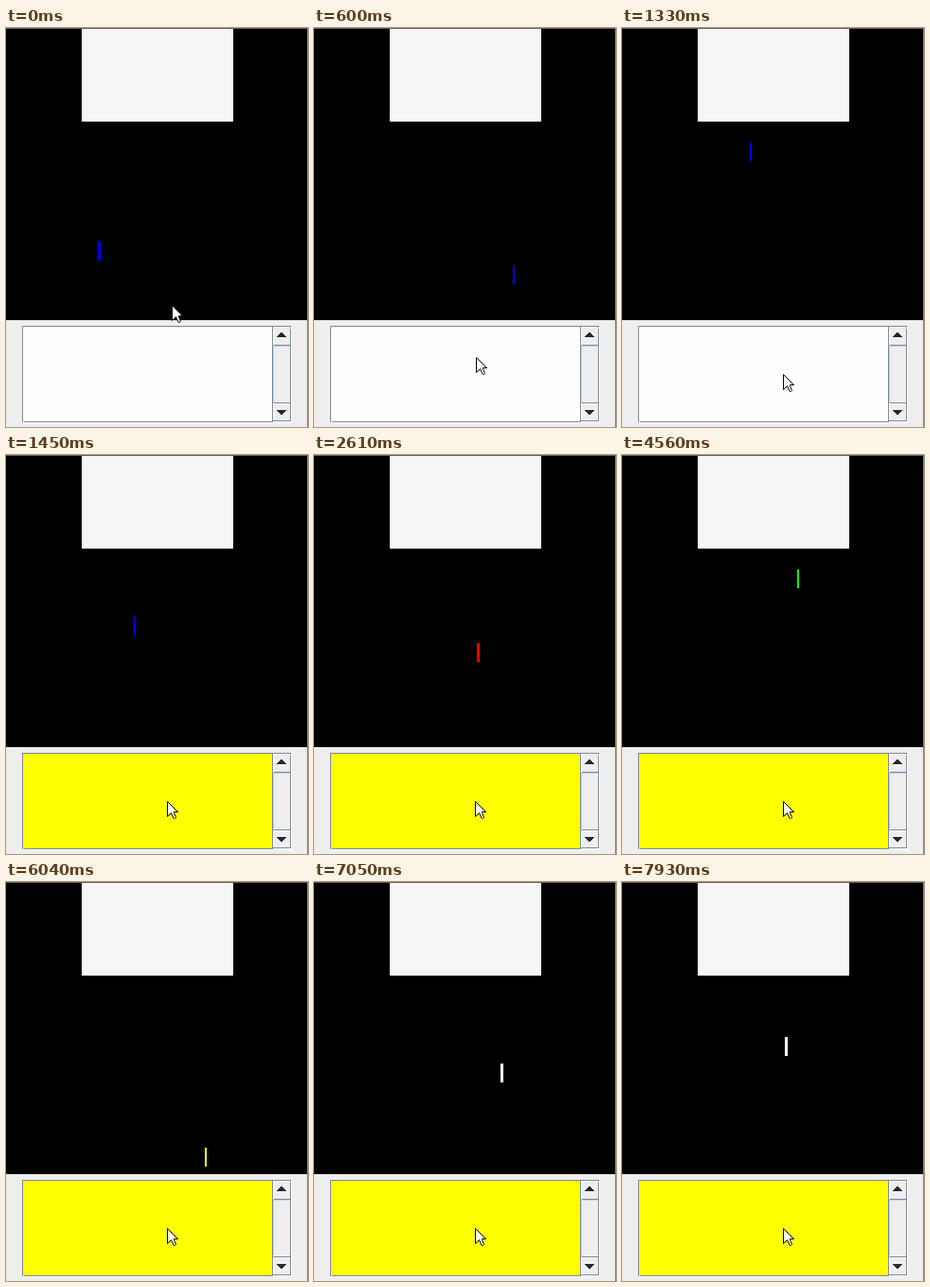
Animation of 319 by 422 pixels, one loop 8 s. Source, as an HTML page with a canvas:

```html
<!DOCTYPE html>
<html lang="en">
<head>
<meta charset="utf-8">
<title>Falling notes</title>
<style>
html, body { margin: 0; width: 100%; height: 100%; overflow: hidden; background: #eee; }
canvas { display: block; }
</style>
</head>
<body>
<canvas id="stage" width="319" height="422"></canvas>
<script>
const ctx = document.getElementById('stage').getContext('2d');
const LOOP = 8000, STEPS = 55, YELLOW_AT = 1450;
const TOP = 99, FLOOR = 308, SPEED = 0.41, NOTE_HEIGHT = 20;

// One digit per note: the column it falls in
const TUNE = '0963864257091836';
const COLORS = ['#0000ff', '#ff0000', '#10f010', '#ffff50', '#ffffff'];

// Key points of slightly uneven clocks: index, time
const NOTE_CLOCK = [[0, -310], [3, 1274], [5, 2365], [9, 4505], [11, 5595], [15, 7771]];
const STEP_CLOCK = [[0, 0], [9, 1330], [10, 1450], [18, 2610], [31, 4560], [41, 6040], [54, 7930]];

const EDGE = '#7a8a99', SHADE = '#b8cfe5', LIGHT = '#fff', FACE = '#eee';

function interpolate(points, x) {
  const i = Math.max(1, points.findIndex(p => x <= p[0]));
  const [x0, y0] = points[i - 1], [x1, y1] = points[i];
  return y0 + (y1 - y0) * (x - x0) / (x1 - x0);
}

const notes = [...TUNE].map((column, i) => ({
  start: interpolate(NOTE_CLOCK, i),
  x: 97.5 + 12.5 * column,
  color: COLORS[Math.max(0, Math.floor((i - 1) / 3))]
}));
const steps = Array.from({ length: STEPS }, (_, i) => Math.round(interpolate(STEP_CLOCK, i)));

function box(x, y, w, h, color) {
  ctx.fillStyle = color;
  ctx.fillRect(x, y, w, h);
}

function row(x0, x1, y, color) { box(x0, y, x1 - x0 + 1, 1, color); }
function col(x, y0, y1, color) { box(x, y0, 1, y1 - y0 + 1, color); }

function drawStage() {
  box(0, 0, 319, 309, '#000');
  box(80, 1, 160, 98, '#f6f6f6');
  row(0, 318, 0, '#606060');
}

function drawNote(t) {
  const { start, x, color } = notes.filter(n => n.start <= t).pop();
  const y = Math.floor(TOP + SPEED * (t - start));
  const left = Math.floor(x);
  const bottom = Math.min(FLOOR, y + NOTE_HEIGHT);
  if (bottom > y) box(left, y, x > left ? 3 : 2, bottom - y, color);
}

function drawArrow(y, dir) {
  for (let i = 0; i < 5; i++) row(290 - i, 291 + i, y + i * dir, '#282828');
}

function drawScrollBar() {
  box(282, 316, 18, 100, FACE);
  col(281, 316, 415, EDGE);

  row(282, 299, 316, LIGHT);
  col(282, 316, 334, LIGHT);
  drawArrow(322, 1);

  col(282, 336, 396, SHADE);
  row(282, 299, 336, SHADE);
  row(283, 300, 335, EDGE);
  row(283, 300, 396, EDGE);

  row(282, 299, 397, LIGHT);
  col(282, 397, 414, LIGHT);
  row(282, 300, 415, EDGE);
  row(282, 301, 416, LIGHT);
  drawArrow(408, -1);
}

function drawPanel(t) {
  box(0, 309, 319, 113, FACE);
  box(17, 315, 284, 102, EDGE);
  box(18, 316, 263, 100, t < YELLOW_AT ? '#fefefe' : '#ff0');
  col(301, 316, 417, LIGHT);
  row(18, 301, 417, LIGHT);
  drawScrollBar();
  box(300, 317, 1, 1, FACE);
  box(18, 416, 1, 1, FACE);
  col(318, 0, 421, '#808080');
}

function drawPointer(t) {
  const k = Math.min(1, Math.max(0, (t - 150) / 590));
  ctx.save();
  ctx.translate(Math.round(175 - 5 * k) + 0.5, Math.round(293 + 73 * k) + 0.5);
  ctx.beginPath();
  [[0, 0], [0, 16], [4, 12], [6.5, 17.5], [8, 18], [9, 17], [7, 12], [7, 11], [11, 11]]
    .forEach(([x, y]) => ctx.lineTo(x, y));
  ctx.closePath();
  ctx.fillStyle = '#fff';
  ctx.fill();
  ctx.strokeStyle = '#000';
  ctx.stroke();
  ctx.restore();
}

function render(now) {
  const time = now % LOOP;
  const t = steps.filter(step => step <= time).pop() || 0;
  drawStage();
  drawNote(t);
  drawPanel(t);
  drawPointer(t);
}

function loop() {
  render(performance.now());
  requestAnimationFrame(loop);
}
loop();
</script>
</body>
</html>
```
